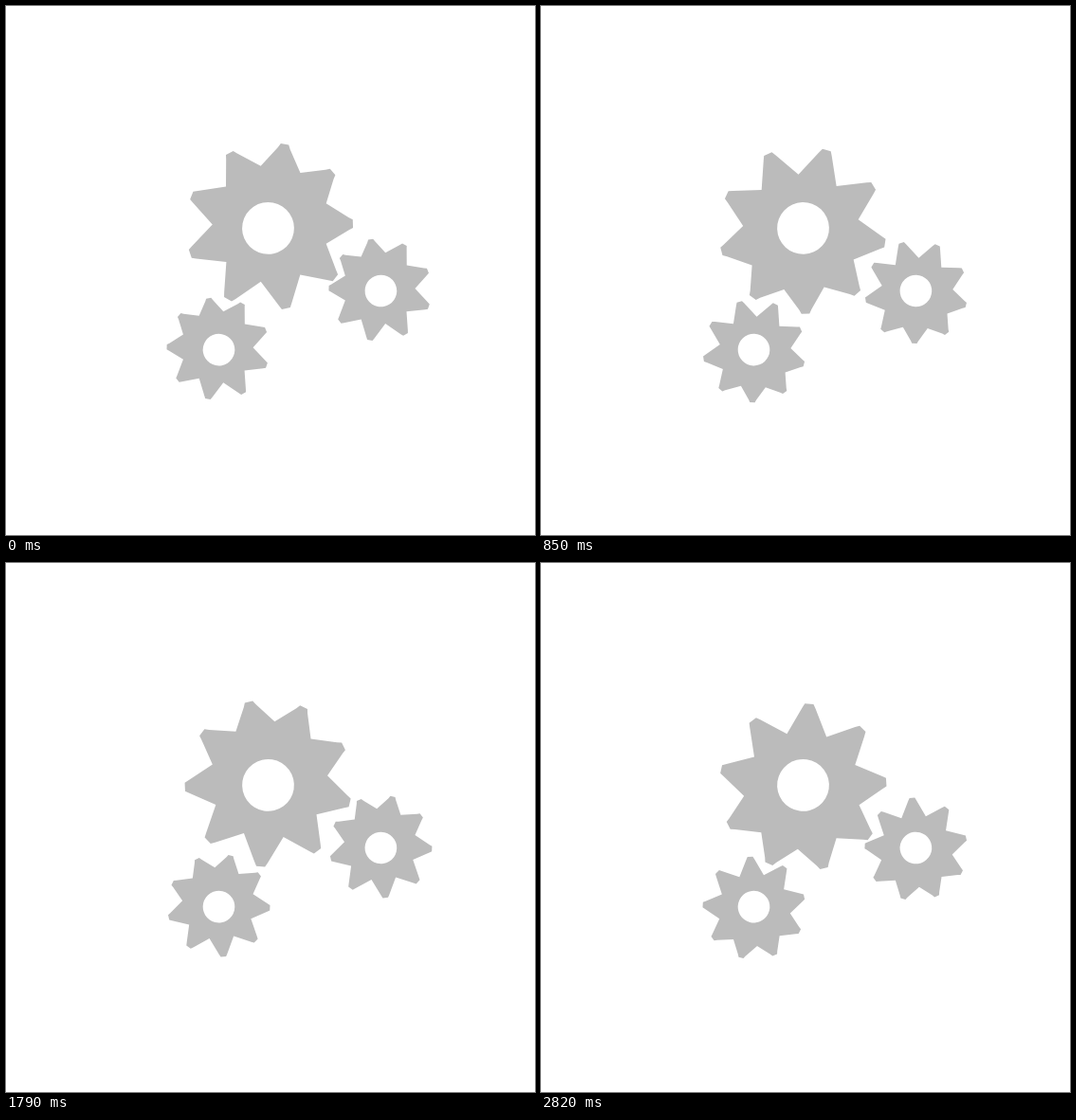
Write an HTML page with a canvas that moves like this. It is 558x558 px and loops after 2850 ms.

```html
<!DOCTYPE html>
<html lang="en">
<head>
<meta charset="utf-8">
<title>Turning gears</title>
<style>
  html, body { margin: 0; width: 100%; height: 100%; overflow: hidden; background: #fff; }
  canvas { display: block; width: 558px; height: 558px; }
</style>
</head>
<body>
<canvas id="stage" width="558" height="558"></canvas>
<script>
const ctx = document.getElementById('stage').getContext('2d');
const SIZE = 558, LOOP = 2850, RAD = Math.PI / 180;
const GREY = '#bbb', SMALL = 0.614;

// One full turn takes 49 small jumps; the pace varies slightly between poses [ms, degrees].
const STEP = 360 / 49;
const POSES = [[0, -79.2], [390, 0], [850, 88], [1420, 193.6], [1790, 256.5], [2360, 360], [2820, 435.5]];

function turnAt(ms) {
  const next = POSES.findIndex(([t]) => t > ms);
  if (next < 0) return POSES[POSES.length - 1][1];
  const [t0, a0] = POSES[next - 1], [t1, a1] = POSES[next];
  const moved = (a1 - a0) * (ms - t0) / (t1 - t0);
  return a0 + STEP * Math.floor(moved / STEP);
}

// The rim sits off-centre from the hole, towards LEAN.
const LEAN = 113 * RAD, SHIFT = 5.3;

function rimPoint(path, angle, radius, swell) {
  const a = angle + SHIFT / radius * Math.sin(LEAN - angle);
  const r = radius + swell * Math.cos(LEAN - angle);
  path.lineTo(r * Math.sin(a), -r * Math.cos(a));
}

function gearPath(teeth, hole) {
  const path = new Path2D(), pitch = 2 * Math.PI / teeth;
  for (let i = 0; i < teeth; i++) {
    const a = 9 * RAD + i * pitch;
    rimPoint(path, a - pitch / 2, 62, 5.6);
    rimPoint(path, a - 0.08, 84.2, 2.2);
    rimPoint(path, a - 0.05, 88.4, 2.2);
    rimPoint(path, a + 0.05, 88.4, 2.2);
    rimPoint(path, a + 0.08, 84.2, 2.2);
  }
  path.closePath();
  path.moveTo(hole, 0);
  path.arc(0, 0, hole, 0, 2 * Math.PI);
  return path;
}

const GEAR = gearPath(9, 27.4);

// A negative dir mirrors the gear, so it also turns the other way.
function drawGear(x, y, scale, dir, turn) {
  ctx.save();
  ctx.translate(x, y);
  ctx.scale(dir * scale, scale);
  ctx.rotate(turn);
  ctx.fill(GEAR, 'evenodd');
  ctx.restore();
}

function draw(ms) {
  const turn = turnAt(ms) * RAD;
  ctx.fillStyle = '#fff';
  ctx.fillRect(0, 0, SIZE, SIZE);
  ctx.fillStyle = GREY;
  drawGear(276.5, 234.4, 1, 1, turn);
  drawGear(224.5, 362.6, SMALL, -1, turn);
  drawGear(395.4, 300.5, SMALL, -1, turn);
}

const start = performance.now();
function loop() {
  draw((performance.now() - start) % LOOP);
  requestAnimationFrame(loop);
}
loop();
</script>
</body>
</html>
```
